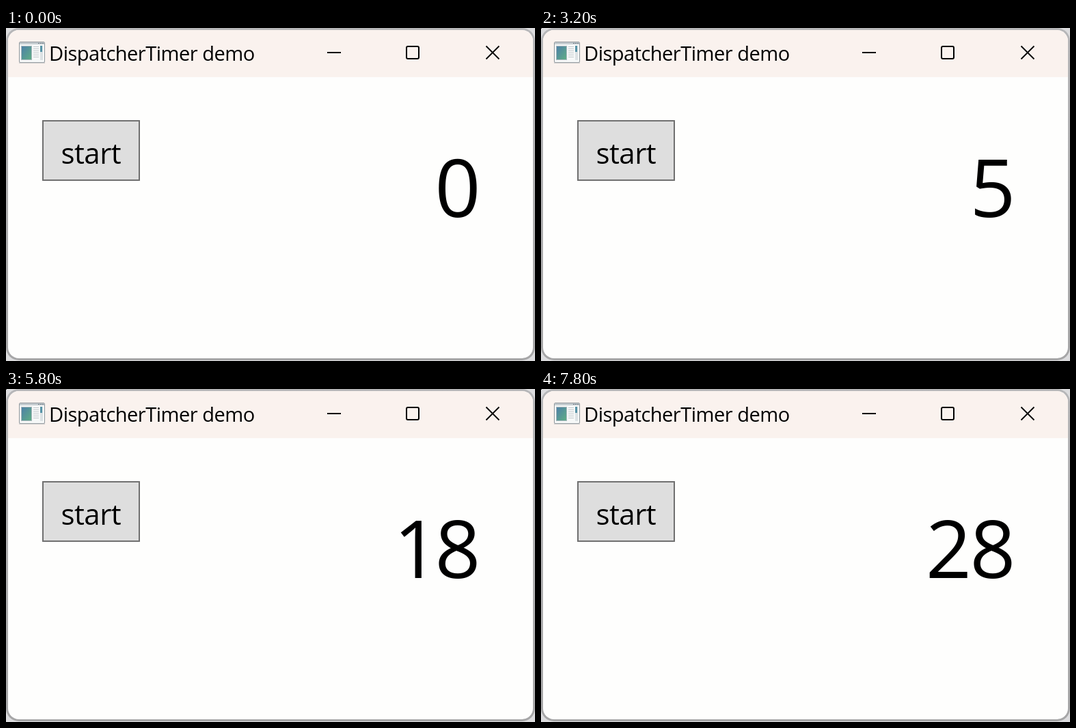
These frames come from a looping animation (774x488 px, 8 s). An HTML page:

```html
<!DOCTYPE html>
<html lang="en">
<head>
<meta charset="utf-8">
<title>DispatcherTimer demo</title>
<style>
  html, body { margin: 0; width: 100%; height: 100%; overflow: hidden; }
  svg { display: block; width: 774px; height: 488px; }
  text { font-family: "Open Sans", "Noto Sans", sans-serif; fill: #000; }
  .digit { font-size: 117px; text-anchor: middle; }
</style>
</head>
<body>
<svg viewBox="0 0 774 488">
  <defs>
    <linearGradient id="edge" x1="0" y1="0" x2="0" y2="1">
      <stop offset="0" stop-color="#b6b6b8"/>
      <stop offset="1" stop-color="#a6a6a7"/>
    </linearGradient>
    <linearGradient id="screen" x1="0" y1="0" x2="1" y2="1">
      <stop offset="0" stop-color="#4d7fa8"/>
      <stop offset="1" stop-color="#5fae84"/>
    </linearGradient>
    <clipPath id="pane"><rect x="3" y="3" width="768" height="481" rx="16"/></clipPath>
  </defs>

  <rect width="774" height="488" fill="#dcdcde"/>
  <rect width="774" height="487" rx="19" fill="url(#edge)"/>
  <g clip-path="url(#pane)">
    <rect width="774" height="488" fill="#fefefd"/>
    <rect width="774" height="72" fill="#faf2ee"/>
  </g>
  <rect id="corner" width="1" height="1" fill="#222"/>

  <g id="icon">
    <rect x="19.5" y="20.5" width="37" height="30" rx="1.5" fill="#f6f8f8" stroke="#8f979c"/>
    <rect x="20" y="21" width="36" height="3" fill="#c5ccd0"/>
    <path d="M47 22.5h2m1 0h2m1 0h2" stroke="#6d7780"/>
    <rect x="22.5" y="26.5" width="15" height="20" fill="url(#screen)" stroke="#a9b8bd"/>
    <path d="M40 27.5h8m-8 3h8m-8 3h8m-8 3h8m-8 3h8m-8 3h8" stroke="#c3c9cc"/>
    <rect x="50" y="26" width="4" height="21" fill="#dce2e4"/>
    <rect x="50" y="26" width="3" height="9" fill="#5693a6"/>
    <path d="M19 51h38" stroke="#a8adb0"/>
  </g>
  <text x="63" y="48" font-size="29" letter-spacing="-.5">DispatcherTimer demo</text>

  <g fill="none" stroke="#000" stroke-width="2">
    <path d="M470 36h20"/>
    <path d="M702.5 26.5l19 19m0-19l-19 19" stroke-width="1.8"/>
    <rect x="586" y="27" width="18" height="18" rx="2"/>
  </g>

  <rect id="button" x="54" y="136" width="141" height="87" stroke-width="2"/>
  <text x="80.5" y="198.500" font-size="42" letter-spacing="-.5">start</text>

  <text id="tens" class="digit" y="276.5"></text>
  <text id="units" class="digit" y="276.5"></text>

  <path id="cursor" d="M0 4V68L13.5 54 23 72.500 34 67.500 25 49.500H46.500Z"
        fill="#fff" stroke="#000" stroke-width="4"/>
</svg>
<script>
const LOOP = 8000, TICK = 200;
const ENTER = 1000, ARRIVE = 1600, PRESS = 2000, RELEASE = 2200, LEAVE = 3000;
const FROM = [3, 231], REST = [129, 194];
const LOOKS = {
  normal: ['#dedede', '#707070'],
  hover: ['#bee6fd', '#3c7fb1'],
  pressed: ['#c4e5f4', '#2c628b']
};
const $ = id => document.getElementById(id);
const show = (el, on) => el.setAttribute('visibility', on ? 'visible' : 'hidden');

function cursorAt(t) {
  const p = Math.min(1, (t - ENTER) / (ARRIVE - ENTER));
  const eased = 1 - (1 - p) ** 2;
  return FROM.map((v, i) => v + (REST[i] - v) * eased);
}

// The narrow "1" sits a little to the right of its cell's centre.
function setDigit(el, char, center) {
  el.textContent = char;
  el.setAttribute('x', center + (char === '1' ? 4 : 0));
}

function render(time) {
  const t = Math.floor(time % LOOP / TICK) * TICK;
  const [x, y] = cursorAt(t);
  const visible = t >= ENTER && t < LEAVE;
  const over = visible && x > 53 && y < 224;
  const pressed = t >= PRESS && t < RELEASE;
  const [fill, stroke] = LOOKS[pressed ? 'pressed' : over ? 'hover' : 'normal'];

  $('button').setAttribute('fill', fill);
  $('button').setAttribute('stroke', stroke);
  show($('cursor'), visible);
  $('cursor').setAttribute('transform', `translate(${x} ${y})`);
  show($('corner'), t >= TICK);

  const count = Math.max(0, (t - RELEASE) / TICK);
  setDigit($('units'), String(count % 10), 661);
  setDigit($('tens'), count > 9 ? String(Math.floor(count / 10)) : '', 596.5);
}

const start = performance.now();
function loop() {
  render(performance.now() - start);
  requestAnimationFrame(loop);
}
loop();
</script>
</body>
</html>
```
